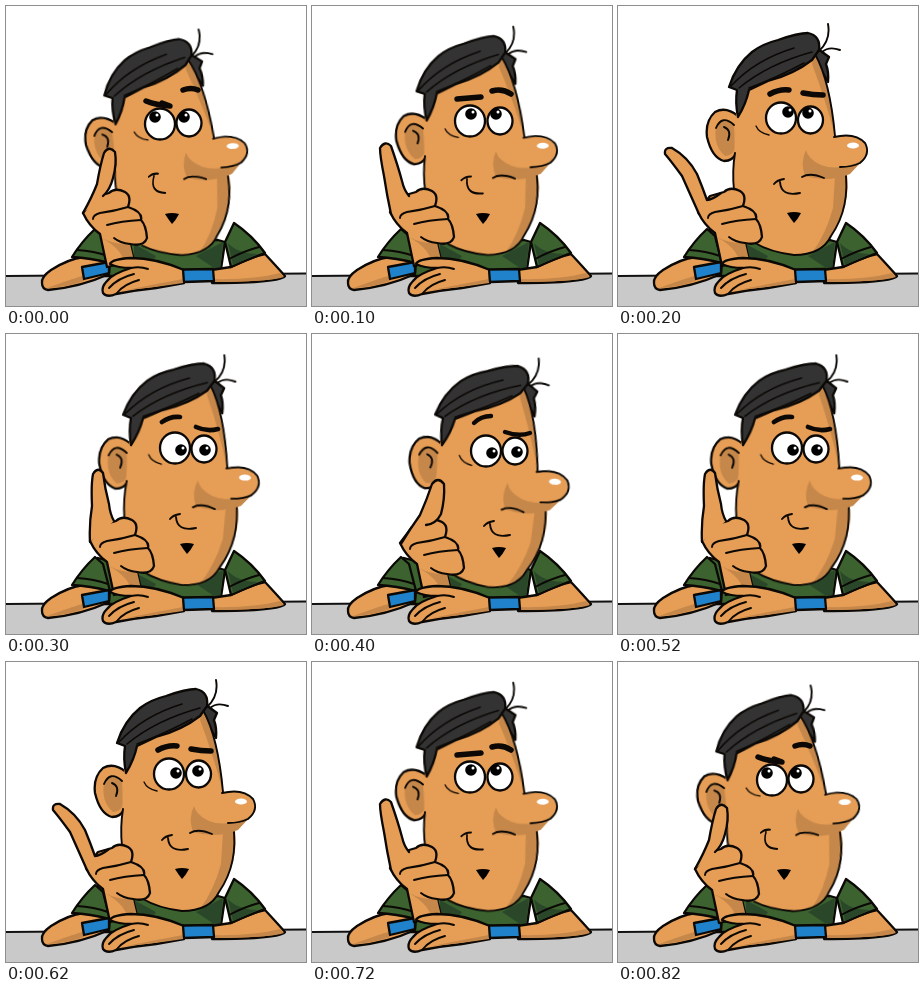
An HTML page for the animation above (0.93 s loop, 300 by 300 pixels).

```html
<!DOCTYPE html>
<html lang="en">
<head>
<meta charset="utf-8">
<title>Thinking man</title>
<style>
html, body { margin: 0; width: 100%; height: 100%; overflow: hidden; background: #fff; }
svg { display: block; width: 100vw; height: 100vh; }
.ink { stroke: #0b0805; stroke-width: 2.3; stroke-linejoin: round; stroke-linecap: round; }
.line { fill: none; stroke-width: 1.9; }
.skin { fill: #e69d55; }
.shade { fill: #c6884a; }
.shirt { fill: #3b622f; }
.dark { fill: #2a4829; }
.band { fill: #1f82cb; }
.hair { fill: #333; }
.brow { fill: none; stroke-width: 5.5; }
.white { fill: #fff; }

/* Every part holds its pose and then jumps to the next one. */
#head, #fist, #finger, .face { animation: 930ms step-end infinite; }
#head { animation-name: head; }
#fist { animation-name: fist; }
#finger { animation-name: finger; }
.face { visibility: hidden; }
#think { animation-name: think; }
#rise { animation-name: rise; }
#point { animation-name: point; }
#tilt { animation-name: tilt; }
#rest { animation-name: rest; }
#back { animation-name: back; }

@keyframes head {
  0%, 88.172%, 100% { transform: matrix(1, -.05, .075, .97, -18.75, 16.5); }
  10.753%, 77.419% { transform: matrix(1, -.025, .037, .985, -9.4, 8.2); }
  21.505%, 66.667% { transform: none; }
  32.258%, 55.914% { transform: matrix(1, .035, -.036, 1, 9, -4.1); }
  43.011% { transform: matrix(1, .07, -.072, 1, 18, -8.2); }
}
@keyframes fist {
  0%, 88.172%, 100% { transform: translate(-3px, 1px); }
  10.753%, 77.419% { transform: translate(-2px, 0); }
  21.505%, 66.667% { transform: none; }
  32.258%, 55.914% { transform: translate(4px, 1px); }
  43.011% { transform: translate(8px, 3px); }
}
@keyframes finger {
  0%, 88.172%, 100% { d: path("M77 207Q86 191 91 178Q94 160 98 147Q103 139 109 146Q111 158 107 172Q104 184 97 190"); }
  10.753%, 77.419% { d: path("M79 208Q75 190 72 170Q68 150 68 142Q73 134 79 140Q86 160 90 175Q92 184 97 190"); }
  21.505%, 66.667% { d: path("M81 208Q72 188 64 170Q53 155 47 148Q46 141 54 142Q70 151 79 168Q84 180 89 194Q94 194 103 187"); }
  32.258%, 55.914% { d: path("M84 208Q83 190 86 172Q85 150 87 140Q92 132 97 139Q99 155 103 170Q104 180 108 187"); }
  43.011% { d: path("M89 210Q98 195 108 181Q115 165 120 150Q126 142 132 150Q133 165 129 180Q124 190 114 191"); }
}
@keyframes think { 0%, 88.172%, 100% { visibility: visible; } 10.753% { visibility: hidden; } }
@keyframes rise { 0%, 21.505%, 88.172% { visibility: hidden; } 10.753%, 77.419% { visibility: visible; } }
@keyframes point { 0%, 32.258% { visibility: hidden; } 21.505% { visibility: visible; } }
@keyframes tilt { 0%, 43.011%, 66.667% { visibility: hidden; } 32.258%, 55.914% { visibility: visible; } }
@keyframes rest { 0%, 55.914% { visibility: hidden; } 43.011% { visibility: visible; } }
@keyframes back { 0%, 77.419% { visibility: hidden; } 66.667% { visibility: visible; } }
</style>
</head>
<body>
<svg viewBox="0 0 300 300">
  <defs>
    <ellipse id="left-eye" class="ink white" rx="15" ry="15.5"/>
    <ellipse id="right-eye" class="ink white" rx="12.5" ry="13.5"/>
    <g id="pupil"><circle r="5.8"/><circle class="white" cx="2" cy="-2" r="1.5"/></g>
    <path id="beard" d="M-7-4Q0-6 7-4Q4 2 0 6Q-4 1-7-4Z"/>
    <g id="smile" class="ink line"><path d="M-6 2Q-3-2 4-3M0 0Q1 15 20 11"/></g>
  </defs>

  <path d="M0 270L300 268V300H0Z" fill="#c9c9c9"/>
  <path d="M0 270L300 267.5" stroke="#111" stroke-width="2.2"/>

  <!-- torso and far arm -->
  <path class="ink shirt" d="M92 224L130 234L212 234L219 236L214 270H96Z"/>
  <path class="dark" d="M128 238L150 250L140 266H128ZM190 250L217 236L214 266Z"/>
  <path class="ink skin" d="M36 277Q35 271 45 264Q62 253 78 251L104 256L103 268Q75 281 42 284Q36 283 36 277Z"/>
  <path class="shade" d="M41 282Q60 275 76 270L78 275Q58 282 41 282Z"/>
  <path class="ink shirt" d="M89 223Q76 235 66 251Q84 252 104 257L97 230Z"/>
  <path class="ink line" d="M71 244Q88 245 102 250"/>
  <path class="ink band" d="M76 261L103 256L103 267L78 273Z"/>

  <g id="head">
    <path class="ink hair" d="M196 40L211 51L208 58Q211 66 210 76L196 52Z"/>
    <path class="ink skin" d="M120 110Q108 100 97 106Q87 115 89 131Q94 152 106 155Q115 155 118 147Z"/>
    <path class="shade" d="M116 118Q104 108 98 121Q95 140 107 150Q114 150 117 143Z"/>
    <path class="ink line" d="M116 119Q104 108 98 122M106 121Q114 124 110 134"/>
    <path class="skin" d="M119 82L197 47Q210 72 217 128L229 168Q233 200 213 230Q204 249 176 249Q150 246 133 235L115 178Z"/>
    <path class="shade" d="M197 47Q212 75 217 130Q207 92 194 58ZM227 163Q233 201 213 230Q204 244 194 247Q208 228 215 202L217 170Z"/>
    <path class="ink line" d="M197 48Q212 75 217 130M227 162Q233 201 213 230Q204 249 176 249Q152 246 137 237M117 147Q114 165 116 184"/>
    <path class="skin" d="M216 131Q236 127 246 137Q252 147 243 156Q231 162 214 161L190 155Z"/>
    <path class="shade" d="M188 144Q182 156 187 170Q210 177 232 168L245 154Q220 166 203 159Q190 153 188 144Z"/>
    <path class="ink line" d="M216 131Q237 126 247 137Q253 148 242 157Q234 161 222 161M184 171Q192 166 206 172"/>
    <ellipse class="white" cx="235" cy="139.5" rx="6" ry="3"/>
    <path class="ink line" d="M138 120Q141 127 151 129" style="stroke-width:1.3"/>
    <path class="ink hair" d="M111 81Q118 59 134 46Q144 38 160 34Q180 27 190 27Q203 30 201 44L194 54Q176 68 150 75L131 84Q128 98 120 111Q117 97 119 84Z"/>
    <path class="ink line" d="M113 80Q137 54 176 42M121 82Q150 58 194 46M131 82Q158 72 186 57" style="stroke-width:1.6"/>
    <path class="ink line" d="M201 45Q213 34 210 18M204 46Q211 40 222 44"/>
  </g>

  <g id="think" class="face">
    <use href="#left-eye" x="154" y="118"/><use href="#right-eye" x="183" y="117"/>
    <use href="#pupil" x="149" y="111"/><use href="#pupil" x="178" y="111"/>
    <path class="ink brow" d="M140 95Q150 99 164 100L156 97M177 84Q185 81 192 84"/>
    <use href="#smile" transform="translate(148 170) rotate(18)scale(.8 1.15)"/>
    <use href="#beard" x="166" y="212"/>
  </g>
  <g id="rise" class="face">
    <use href="#left-eye" x="158" y="115"/><use href="#right-eye" x="188" y="115"/>
    <use href="#pupil" x="159" y="108"/><use href="#pupil" x="184" y="108"/>
    <path class="ink brow" d="M145 93Q157 92 169 91M180 85Q190 82 199 88"/>
    <use href="#smile" transform="translate(155 173) rotate(9)scale(.9 1.07)"/>
    <use href="#beard" x="171" y="212"/>
  </g>
  <g id="point" class="face">
    <use href="#left-eye" x="163" y="112"/><use href="#right-eye" x="192.5" y="114"/>
    <use href="#pupil" x="170" y="106"/><use href="#pupil" x="190" y="107"/>
    <path class="ink brow" d="M152 88Q161 83 171 84M185 87Q195 89 205 89"/>
    <use href="#smile" x="162" y="176"/>
    <use href="#beard" x="176" y="211"/>
  </g>
  <g id="back" class="face">
    <use href="#left-eye" x="163" y="112"/><use href="#right-eye" x="192.5" y="112"/>
    <use href="#pupil" x="170" y="111"/><use href="#pupil" x="192" y="109"/>
    <path class="ink brow" d="M152 88Q161 83 171 84M185 87Q195 89 205 89"/>
    <use href="#smile" x="162" y="176"/>
    <use href="#beard" x="176" y="211"/>
  </g>
  <g id="tilt" class="face">
    <use href="#left-eye" x="169" y="114"/><use href="#right-eye" x="198" y="115"/>
    <use href="#pupil" x="175" y="116"/><use href="#pupil" x="199" y="116"/>
    <path class="ink brow" d="M156 88Q164 82 174 83M190 93Q201 98 212 95" style="stroke-width:4.6"/>
    <use href="#smile" x="170" y="183"/>
    <use href="#beard" x="181" y="214"/>
  </g>
  <g id="rest" class="face">
    <use href="#left-eye" x="174" y="117"/><use href="#right-eye" x="203" y="117"/>
    <use href="#pupil" x="180" y="119"/><use href="#pupil" x="205" y="118"/>
    <path class="ink brow" d="M162 89Q169 82 179 82M193 98Q207 103 218 99" style="stroke-width:4.4"/>
    <use href="#smile" x="178" y="190"/>
    <use href="#beard" x="187" y="218"/>
  </g>

  <!-- raised hand -->
  <g id="fist">
    <path class="ink skin" d="M80 206Q86 219 97 227L104 260L131 254L127 237Q141 240 144 231Q143 218 138 213Q140 205 125 200Q129 189 122 185Q112 180 106 186L92 190Z"/>
    <path class="shade" d="M99 231Q112 238 127 237L131 254L121 256Q120 243 99 231Z"/>
    <path class="ink line" d="M125 200Q112 204 97 206Q90 208 90 212M138 213Q118 214 104 218M127 237Q117 236 111 231"/>
  </g>
  <path id="finger" class="ink skin"/>

  <!-- near arm -->
  <path class="ink skin" d="M205 264L225 261Q248 250 259 248Q272 262 279 270Q274 277 206 277Z"/>
  <path class="shade" d="M207 273Q247 274 274 267L278 271Q262 276 207 276Z"/>
  <path class="ink shirt" d="M228 217Q246 229 259 247Q240 254 225 261Q222 248 219 236Z"/>
  <path class="dark" d="M222 237Q232 248 252 248L227 259Z"/>
  <path class="ink line" d="M223 253Q238 245 253 241"/>
  <path class="ink skin" d="M178 264Q150 252 125 252Q106 253 104 258Q112 262 125 262Q106 268 101 275Q95 281 97 287Q101 292 110 288Q130 284 150 282L178 277Z"/>
  <path class="shade" d="M120 284Q150 278 177 273L177 277Q145 282 120 284Z"/>
  <path class="ink line" d="M125 262Q134 260 142 263M103 282Q112 272 128 268M111 287Q118 278 133 274"/>
  <path class="ink band" d="M177 263.5L207 263L208 275L178 276Z"/>
</svg>
</body>
</html>
```
